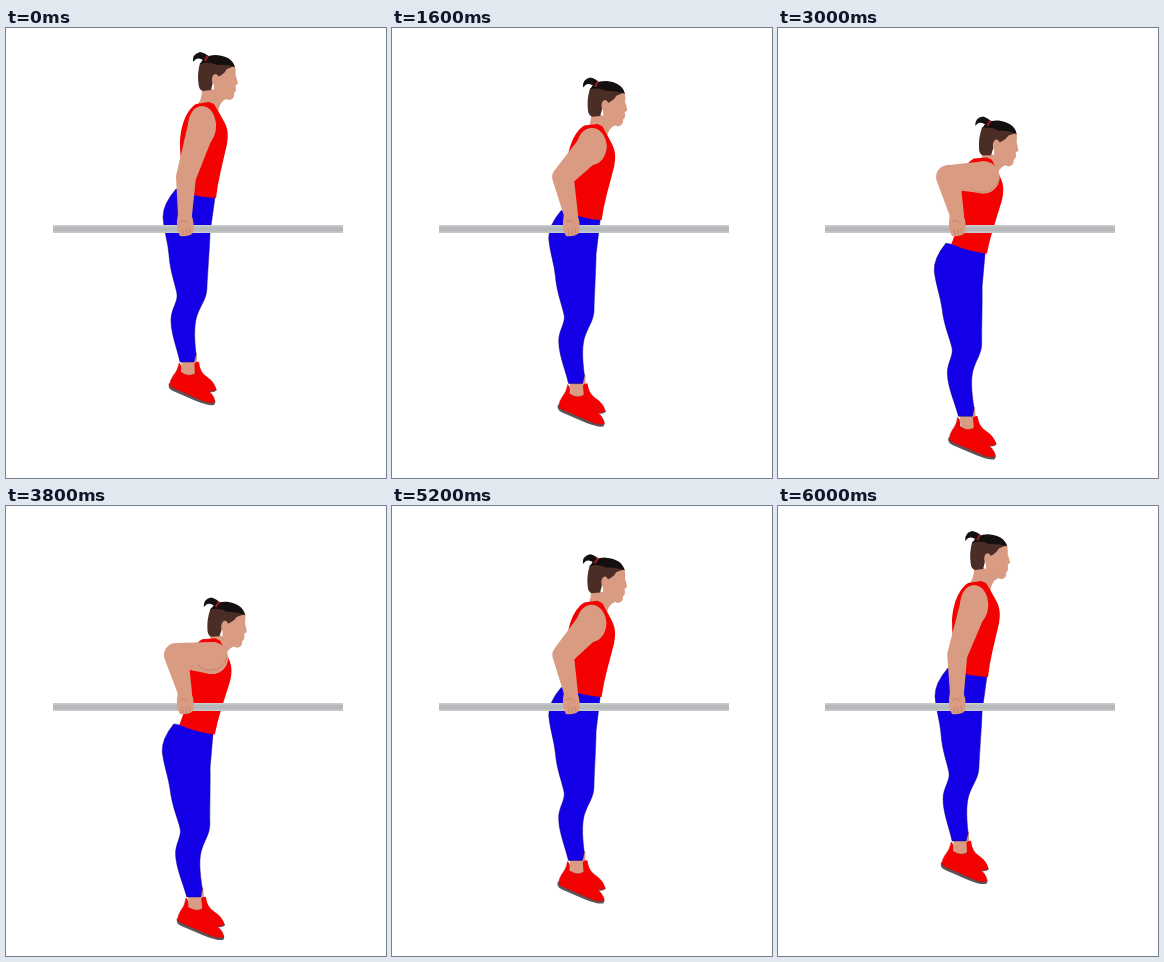
An HTML page for the animation above (6100 ms loop, 380x450 px).

```html
<!DOCTYPE html>
<html lang="en">
<head>
<meta charset="utf-8">
<title>Straight bar dip</title>
<style>
  html, body { margin: 0; width: 100%; height: 100%; overflow: hidden; background: #fff; }
  svg { display: block; width: 380px; height: 450px; }
  .skin { fill: #d99c82; }
  .red { fill: #f40202; }
  .sole { fill: #5c5558; }
  .hair { fill: #15100f; }
</style>
</head>
<body>
<svg viewBox="0 0 380 450">
  <defs>
    <linearGradient id="steel" x1="0" y1="0" x2="0" y2="1">
      <stop offset="0" stop-color="#cfd0d2"/>
      <stop offset=".3" stop-color="#b8babc"/>
      <stop offset=".65" stop-color="#b4b6b9"/>
      <stop offset="1" stop-color="#cbccce"/>
    </linearGradient>
  </defs>

  <g id="lower">
    <path class="skin" d="M187 324L191 325L191 337L186 340Z"/>
    <path class="sole" d="M190 354L200 363Q207 366 211 362L208 357Z"/>
    <path class="red" d="M187 337Q190 333 193 334Q194 344 200 348Q210 355 210 362Q205 365 199 361L186 350Z"/>
    <path class="skin" d="M175 331H188L189 347Q182 350 176 346Z"/>
    <path class="sole" d="M163 355Q161 360 167 363L190 373Q202 378 208 377Q210 375 209 372L190 368Z"/>
    <path class="red" stroke="#b81010" stroke-width=".4" d="M173 335Q176 337 175 344Q182 350 190 345Q191 352 197 358Q209 367 209 374Q204 376 197 373L165 359Q162 356 167 348Q172 342 173 335Z"/>
    <path fill="#1400e6" stroke="#10007c" stroke-width=".5" d="M170 161Q157 176 157 189C158 203 162 214 163 227C164 243 169 255 171 266C172 274 165 281 165 292C165 306 171 320 174 334H188L190 326C188 308 188 294 192 285C196 275 201 270 201 258C202 240 204 212 204 205L209 169L187 164Z"/>
  </g>

  <g id="head">
    <path class="skin" d="M196 58L215 64L220 71Q213 74 212 85L204 92L188 80Q197 74 196 58Z"/>
    <path class="skin" d="M207 36L229 38Q230 44 229.500 47Q231 51 232 55.500L229.500 57.500L230 61Q230 64 228 65Q229 71 223 72Q214 70 208 62Z"/>
    <path fill="#4a2d25" d="M194 35Q191 46 192.500 56Q193 62 197 63L205 62Q207 56 207 51L214 48Q219 45 221 41L228.500 38L212 31Z"/>
    <ellipse class="skin" cx="209.500" cy="51.500" rx="3.500" ry="5.500"/>
    <path class="hair" d="M194 36Q198 27 210 27Q226 28 229 39Q220 36 211 37Q202 33 194 36Z"/>
    <path class="hair" d="M187 34Q186 26 194 24Q200 25 203 29L200 34Q194 29 190 31Z"/>
    <path fill="none" stroke="#a02020" stroke-width="2" d="M202 27.500L199 33"/>
  </g>

  <path id="shirt" class="red" d="M203 74L190 76C178 84 174 103 174 116C174 135 178 148 177 152L174 163Q190 169 210 170C212 152 217 134 221 116C224 100 218 94 215 88L208 76Z"/>
  <rect x="47" y="197" width="290" height="8" fill="url(#steel)"/>

  <ellipse id="shoulder" class="skin"/>
  <path id="arm" class="skin"/>
  <path class="skin" d="M172 186H185Q189 195 187 205Q182 209 174 208Q169 200 172 186Z"/>
  <path id="fold" fill="none" stroke="#c2846c" d="M192 159Q198 165 206 164Q217 163 221 151"/>
  <path fill="none" stroke="#bd8069" stroke-width=".8" d="M176 201L177 207M180 201V207M183 200L184 206M174 194Q178 191 182 195"/>
</svg>

<script>
const LOOP = 6100, STEP = 100;
const $ = id => document.getElementById(id);
const mix = (a, b, k) => a + (b - a) * k;
const set = (id, attrs) => {
  for (const name in attrs) $(id).setAttribute(name, attrs[name]);
};

// Sine ease from 0 to 1 between two times
function ease(t, from, to) {
  const k = Math.min(1, Math.max(0, (t - from) / (to - from)));
  return Math.sin(k * Math.PI / 2) ** 2;
}

// 0 = arms straight, 1 = lowest; a short hold at the bottom
const depth = t => ease(t, 250, 3450) - ease(t, 3750, 6200);

// Two circles joined by their outer tangents
function limb(a, b) {
  const dir = Math.atan2(b.y - a.y, b.x - a.x);
  const off = Math.acos((a.r - b.r) / Math.hypot(b.x - a.x, b.y - a.y));
  const at = (c, turn) => `${c.x + c.r * Math.cos(dir + turn)} ${c.y + c.r * Math.sin(dir + turn)}`;
  return `M${at(a, off)}A${a.r} ${a.r} 0 1 1 ${at(a, -off)}`
    + `L${at(b, -off)}A${b.r} ${b.r} 0 0 1 ${at(b, off)}Z`;
}

function draw(t) {
  const p = depth(t);

  // Legs drop and trail forward, the torso and head tip over
  set('lower', { transform: `translate(${-p} ${57 * p}) translate(0 185) skewX(${3 * p}) translate(0 -185)` });
  set('shirt', { transform: `translate(${-p} ${57 * p}) rotate(${4.5 * p} 190 168)` });
  set('head', { transform: `translate(${9.5 * p} ${69 * p}) rotate(${4.5 * p} 212 48)` });

  // The hand stays on the bar while the elbow swings back early
  const shoulder = { x: mix(196, 206, p), y: mix(98, 152, p), r: mix(14, 16, p) };
  const elbow = { x: mix(180, 170, 1 - (1 - p) ** 5), y: 149, r: mix(10, 12, p) };
  const wrist = { x: 179, y: 187, r: 7 };
  set('shoulder', { cx: shoulder.x, cy: shoulder.y, rx: shoulder.r, ry: mix(20, 16, p) });
  set('arm', { d: limb(shoulder, elbow) + limb(elbow, wrist) });
  set('fold', { opacity: Math.max(0, (p - .85) / .15) });
}

const start = performance.now();
function tick() {
  const t = (performance.now() - start) % LOOP;
  draw(Math.floor(t / STEP) * STEP);
  requestAnimationFrame(tick);
}
tick();
</script>
</body>
</html>
```
